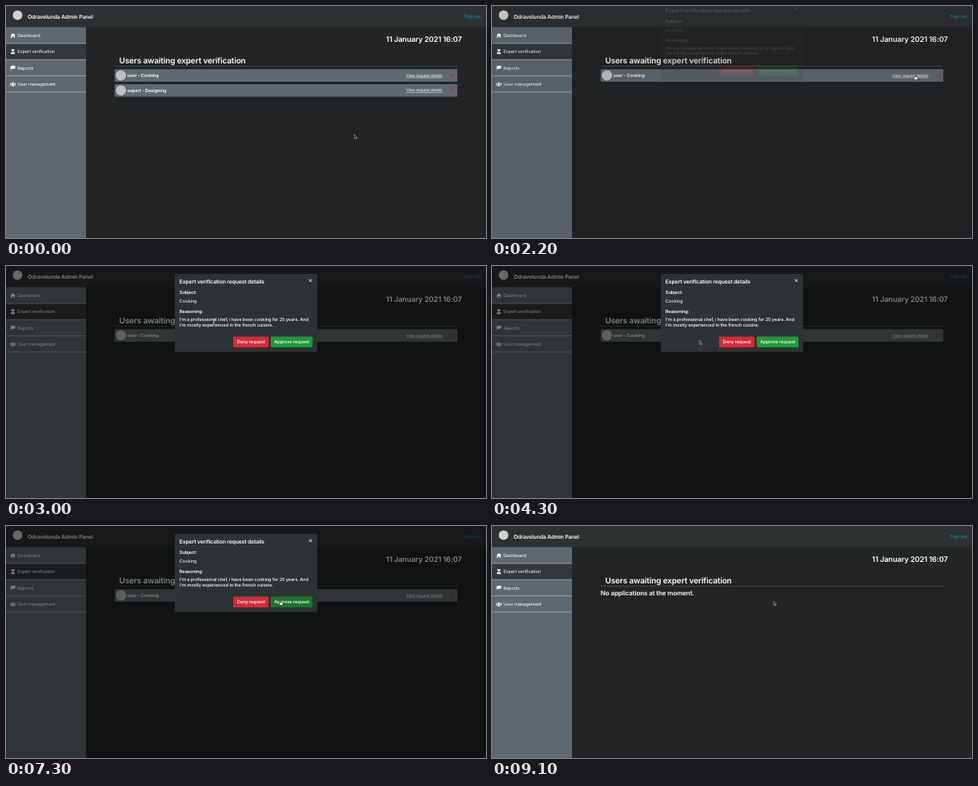
An HTML page for the animation above (9.5 s loop, 600 px wide and 291 px high).

```html
<!DOCTYPE html>
<html lang="en">
<head>
<meta charset="utf-8">
<title>Admin Panel</title>
<style>
  html, body { margin: 0; width: 100%; height: 100%; overflow: hidden; background: #222425; }
  svg { display: block; width: 600px; height: 291px; }
  text { font: 5.69px Inter, "Open Sans", sans-serif; letter-spacing: -.02em; fill: #fff; text-rendering: geometricPrecision; }
  .head { font-size: 10px; font-weight: 600; letter-spacing: -.014em; }
  .date { font-size: 9.3px; }
  .title { font-size: 6.8px; font-weight: 600; }
  .med { font-weight: 500; font-size: 5.73px; }
  .bold { font-weight: 600; }
  .note { font-size: 8px; font-weight: 600; letter-spacing: -.014em; }
  .link { font-size: 4.95px; text-decoration: underline; }
</style>
</head>
<body>
<svg viewBox="0 0 600 291">
  <rect width="600" height="291" fill="#222425"/>
  <rect width="600" height="26.5" fill="#2d3132"/>
  <circle cx="14.5" cy="11.5" r="6" fill="#d0d2d2"/>
  <text class="title" x="27" y="15.6">Odravelunda Admin Panel</text>
  <text x="572.6" y="15.3" style="fill:#1598aa">Sign out</text>

  <rect y="26.5" width="100" height="264.5" fill="#5f696f"/>
  <rect y="47" width="100" height="20.3" fill="#34393b"/>
  <g id="menu"></g>

  <text class="head date" x="569.8" y="44.7" text-anchor="end">11 January 2021 16:07</text>
  <text class="head" x="141.5" y="71.8">Users awaiting expert verification</text>
  <path d="M136 75.6H564" stroke="#5d6163" stroke-width=".6"/>
  <g id="rows"></g>
  <text id="none" class="note" x="135.8" y="87">No applications at the moment.</text>

  <rect id="shade" width="600" height="291"/>
  <g id="modal">
    <rect x="211" y="10" width="178" height="97.7" rx="1.6" fill="#2d3234"/>
    <text class="title" x="216.8" y="22.3">Expert verification request details</text>
    <path d="M378.8 16.7l3.3 3.3m0-3.3l-3.3 3.3" stroke="#fff"/>
    <text class="bold" x="216.8" y="35.2">Subject:</text>
    <text x="216.8" y="46">Cooking</text>
    <text class="bold" x="216.8" y="59.2">Reasoning:</text>
    <text class="med" x="216.8" y="68.9">I'm a professional chef, i have been cooking for 25 years. And</text>
    <text class="med" x="216.8" y="75.6">i'm mostly experienced in the french cuisine.</text>
    <rect id="deny" x="284" y="88.4" width="44.2" height="13.7" rx="1.3"/>
    <text class="med" x="306.3" y="97.4" text-anchor="middle">Deny request</text>
    <rect id="approve" x="330.9" y="88.4" width="52.3" height="13.7" rx="1.3"/>
    <text class="med" x="357.2" y="97.4" text-anchor="middle">Approve request</text>
  </g>

  <g id="cursor" stroke-linejoin="round">
    <path id="arrow" d="M0 0V5.2L1.3 4.2L2.1 6L2.9 5.6L2.1 3.9H3.6Z" fill="#222" stroke="#ccc" stroke-width=".5"/>
    <path id="hand" d="M-.5 .3Q0-.3.5.3V2.2L2.9 2.7Q3.4 2.9 3.2 4L2.6 6H-.6L-2 3.6Q-1.5 2.9-.5 3.8Z" fill="#fff" stroke="#111" stroke-width=".5"/>
    <path id="beam" d="M-1.2-3Q0-3 0-2.2Q0-3 1.2-3M0-2.4V2.4M-1.2 3Q0 3 0 2.2Q0 3 1.2 3" fill="none" stroke="#ddd" stroke-width=".7"/>
  </g>
</svg>
<script>
const LOOP = 9500, STEP = 100;
const REMOVED = 1000, OPEN = 2178, CLOSE = 8420, DONE = 8600;
const $ = id => document.getElementById(id);
const set = (id, name, value) => $(id).setAttribute(name, value);
const show = (id, on) => $(id).style.display = on ? "" : "none";
const clamp = v => Math.min(1, Math.max(0, v));
const easeOut = p => 1 - (1 - p) ** 3;

// icons are drawn around their own centre
const menu = [
  ["Dashboard", "M-3.2 0L0-3L3.2 0H2.4V2.6H.8V.6H-.8V2.6H-2.4V0Z"],
  ["Expert verification", "M-2.8-2.5L0-3.4L2.8-2.5L1.7-2A1.7 1.8 0 1 1-1.7-2ZM-2.6 2.9Q-2.6.5-1.2.2L0 1.3L1.2.2Q2.6.5 2.6 2.9Z"],
  ["Reports", "M-2.8-2.9H-2.2V-2.3Q0-3.2 2.9-2.6V.6Q0 1.4-2.2 1.1V2.9H-2.8Z"],
  ["User management", "M-1.2-1A1.2 1.2 0 1 1 1.2-1A1.2 1.2 0 1 1-1.2-1ZM-2 2.4Q-2 .3 0 .3T2 2.4ZM-3.5 1.6Q-3.4-2 -1.8-1.6L-2.4 1.6ZM3.5 1.6Q3.4-2 1.8-1.6L2.4 1.6Z"]
];
$("menu").innerHTML = menu.map(([label, icon], i) => `
  <g transform="translate(0 ${26.7 + i * 20.3})">
    <path d="${icon}" transform="translate(8.6 10.4)" fill="#fff"/>
    <text x="14.2" y="12.4">${label}</text>
    <path d="M0 20.3H100" stroke="#b9bec1" stroke-width=".7"/>
  </g>`).join("");

$("rows").innerHTML = ["user - Cooking", "expert - Designing"].map((label, i) => `
  <g id="row${i}" transform="translate(0 ${i * 18.8})">
    <rect x="135.8" y="79.2" width="428.4" height="15.8" rx="1.3" fill="#5f696f"/>
    <circle cx="143.7" cy="87" r="6.4" fill="#bfc1c2"/>
    <text class="bold" x="151.6" y="89.2">${label}</text>
    <text class="link" x="500.2" y="88.7">View request details</text>
    <path d="M548.6 87.2l1.6 1.6 3-3.6" fill="none" stroke="#27933f" stroke-width="1.1"/>
    <path d="M556 85.1l3.8 3.8m0-3.8l-3.8 3.8" stroke="#d3202f" stroke-width="1.3"/>
  </g>`).join("");

// pointer moves: from time, to time, end x, end y
const home = [435.4, 161];
const moves = [
  [0, 800, 556.5, 105], [1300, 2000, 528.8, 86.5], [2300, 3200, 256.8, 69],
  [3700, 4250, 259.3, 93], [4350, 4700, 345, 98], [4700, 5300, 281, 110],
  [5300, 5700, 345, 98], [5700, 5900, 265.2, 101.5], [5900, 6100, 258, 94],
  [6500, 6800, 260, 70], [6800, 7500, 345, 94], [7500, 8200, 352, 94.3]
];

function pointer(t) {
  let [x, y] = home;
  for (const [from, to, endX, endY] of moves) {
    const p = easeOut(clamp((t - from) / (to - from)));
    x += (endX - x) * p;
    y += (endY - y) * p;
  }
  return [x, y];
}

function draw(t) {
  const [x, y] = pointer(t);
  const inside = (l, top, r, b) => x >= l && x <= r && y >= top && y <= b;
  const alpha = clamp((t - OPEN) / 150) - clamp((t - CLOSE) / 150);
  const slide = easeOut(clamp((t - OPEN) / 300)) - easeOut(clamp((t - CLOSE) / 300));
  const open = alpha > .5;
  const onDeny = open && inside(284, 88, 328, 102);
  const onApprove = open && inside(331, 88, 383, 102);
  const onText = open && inside(216, 63, 382, 77);
  const onLink = !open && t < CLOSE && (inside(500, 84, 546, 91) ||
    t < REMOVED && inside(547, 103, 562, 111));

  show("row0", t < DONE);
  show("row1", t < REMOVED);
  show("none", t >= DONE);
  set("shade", "opacity", alpha / 2);
  set("modal", "opacity", alpha);
  set("modal", "transform", `translate(0 ${17.8 * (slide - 1)})`);
  set("deny", "fill", onDeny ? "#b82431" : "#d62a38");
  set("approve", "fill", onApprove ? "#18752b" : "#20993a");

  const kind = onDeny || onApprove || onLink ? "hand" : onText ? "beam" : "arrow";
  for (const id of ["arrow", "hand", "beam"]) show(id, id === kind);
  set("cursor", "transform", `translate(${x} ${y})`);
}

const start = performance.now();
function tick() {
  const t = (performance.now() - start) % LOOP;
  draw(Math.floor(t / STEP) * STEP);
  requestAnimationFrame(tick);
}
tick();
</script>
</body>
</html>
```
